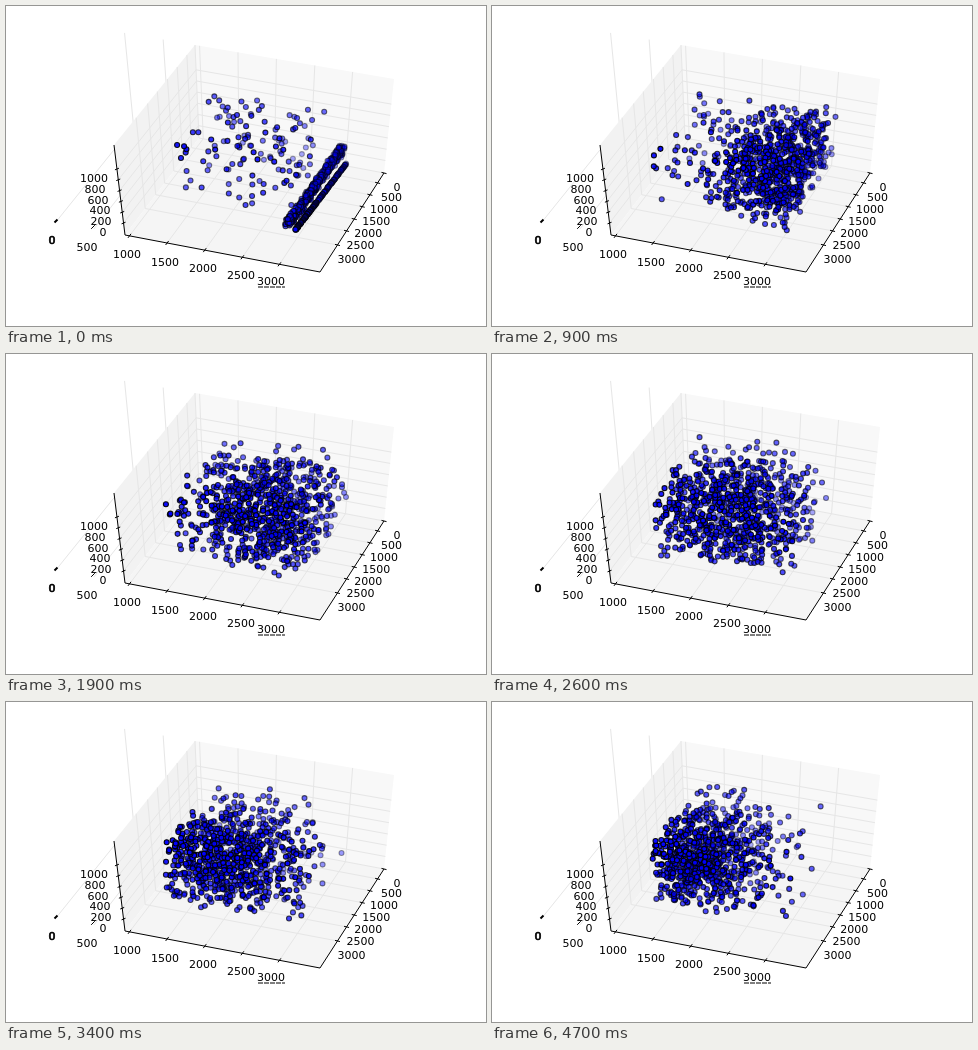
Animation of 480x320 px, one loop 4800 ms. Source, as an HTML page with a canvas:

```html
<!DOCTYPE html>
<html lang="en">
<head>
<meta charset="utf-8">
<title>3D scatter</title>
<style>
  html, body { margin: 0; width: 100%; height: 100%; overflow: hidden; background: #fff; }
  svg, canvas { position: absolute; left: 0; top: 0; width: 480px; height: 320px; }
  text { font: 11px "DejaVu Sans", Verdana, sans-serif; text-anchor: middle; fill: #000; }
  .grid { stroke: #e6e6e6; fill: none; }
  .axis { stroke: #000; fill: none; }
</style>
</head>
<body>
<svg id="plot" viewBox="0 0 480 320"></svg>
<canvas id="cloud" width="480" height="320"></canvas>
<script>
const LOOP = 4800, STEP = 100;
const svg = document.getElementById('plot');
const ctx = document.getElementById('cloud').getContext('2d');

// Corners of the box: [back left, back right, front left, front right]
const FLOOR = [[193, 132], [378, 167], [119, 229], [314, 266]];
const TOP = [[189, 39], [388, 73], [108, 139], [321, 178]];

const mix = (a, b, k) => [a[0] + (b[0] - a[0]) * k, a[1] + (b[1] - a[1]) * k];
const face = (q, u, v) => mix(mix(q[0], q[1], u), mix(q[2], q[3], u), v);
const project = (u, v, w) => mix(face(FLOOR, u, v), face(TOP, u, v), w);

function add(tag, attrs, text) {
  const el = document.createElementNS('http://www.w3.org/2000/svg', tag);
  for (const key in attrs) el.setAttribute(key, attrs[key]);
  if (text !== undefined) el.textContent = text;
  svg.append(el);
}
const pane = (fill, ...pts) => add('polygon', { points: pts.join(' '), fill });
const line = (cls, ...pts) => add('polyline', { points: pts.join(' '), class: cls });
const label = (x, y, text) => add('text', { x, y: y + 4 }, text);
const tick = (x, y, dx, dy) => line('axis', [x - dx, y - dy], [x + dx, y + dy]);

function drawBox() {
  const yLines = [-0.354, -0.16, 0.023, 0.216, 0.409, 0.602, 0.792];
  const wall = u => line('grid', project(u, 0, 1), project(u, 0, 0), project(u, 1, 0));
  yLines.slice(0, 2).forEach(wall);

  pane('#f2f2f2', TOP[0], TOP[2], FLOOR[2], FLOOR[0]);
  pane('#f8f8f8', TOP[0], TOP[1], FLOOR[1], FLOOR[0]);
  pane('#f5f5f5', FLOOR[0], FLOOR[1], FLOOR[3], FLOOR[2]);
  yLines.slice(2).forEach(wall);

  // depth axis on the right
  [0, 0.1, 0.22, 0.34, 0.465, 0.585, 0.727].forEach((v, i) => {
    line('grid', project(0, v, 1), project(0, v, 0), project(1, v, 0));
    const [x, y] = project(1, v, 0);
    tick(x, y, 2.5, 0.6);
    label(x + 14 - (i === 0 ? 1 : 0), y + 14, i * 500);
  });

  // height axis on the left
  for (let i = 0; i <= 5; i++) {
    const w = 0.133 + i * 0.12;
    line('grid', project(0, 1, w), project(0, 0, w), project(1, 0, w));
    const [x, y] = project(0, 1, w);
    tick(x, y, 2, -0.8);
    label([97, 95, 94, 92, 89, 88][i], y + 9, i * 200);
  }

  // width axis along the bottom
  for (let i = 2; i <= 6; i++) {
    const [x, y] = project(yLines[i], 1, 0);
    tick(x, y, 1.5, -2);
    label([121, 159, 197, 235, 265][i - 2], y + [18.5, 19, 18, 18, 17][i - 2], 500 + i * 250 + (i - 2) * 250);
  }
  add('line', { x1: 252, x2: 279, y1: 281, y2: 281, stroke: '#000', 'stroke-dasharray': '5 1' });

  line('axis', TOP[2], FLOOR[2], FLOOR[3], FLOOR[1]);

  // ticks and labels that fall outside the box
  tick(87, 221, 1.8, -1.8);
  label(81, 241, 500);
  add('line', { x1: 48.5, y1: 216.5, x2: 51.5, y2: 213.5, stroke: '#000', 'stroke-width': 2 });
  add('text', { x: 46, y: 238, stroke: '#000', 'stroke-width': 0.7 }, 0);
}

let seed = 20731;
function rand() {
  seed = (seed * 1664525 + 1013904223) % 4294967296;
  return seed / 4294967296;
}
const gauss = () => (rand() + rand() + rand() + rand() - 2) * 1.73;

// Bounce a value back and forth between two walls
function fold(x, lo, hi) {
  const span = hi - lo;
  const m = (((x - lo) % (2 * span)) + 2 * span) % (2 * span);
  return lo + (m < span ? m : 2 * span - m);
}

const U = [0.1, 0.8], V = [0, 0.69], W = [0.01, 0.65];

function makePoint(i) {
  const p = { du: -0.12 + gauss() * 0.04, dv: 0.045 + gauss() * 0.05, dw: gauss() * 0.3,
              su: gauss() * 0.15, sw: rand() * 0.55 };
  const k = rand();
  if (i < 130) {
    Object.assign(p, { u: 0.12 + rand() * 0.6, v: k * 0.62, w: 0.02 + rand() * 0.61, su: 0, sw: 0 });
    p.du *= 0.4;
    p.dw *= 0.5;
  } else if (i < 360) {
    Object.assign(p, { u: 0.765 + 0.03 * (1 - k), v: k * 0.69, w: 0.015 + rand() * 0.015 });
  } else {
    Object.assign(p, { u: 0.715 + 0.055 * (1 - k) + gauss() * 0.008, v: k * 0.66,
                       w: 0.04 + 0.14 * (1 - k) + gauss() * 0.025 });
  }
  return p;
}
const points = Array.from({ length: 850 }, (_, i) => makePoint(i));

function place(p, t) {
  const spread = 1 - Math.exp(-2.2 * t);
  const u = fold(p.u + p.du * t + p.su * spread, ...U);
  const v = fold(p.v + p.dv * t, ...V);
  const w = fold(p.w + p.dw * t + p.sw * spread, ...W);
  const [x, y] = project(u, v, w);
  return { x, y, near: 0.55 * v / V[1] + 0.45 * w / W[1] };
}

function drawCloud(t) {
  ctx.clearRect(0, 0, 480, 320);
  ctx.fillStyle = '#00f';
  ctx.strokeStyle = '#000';
  ctx.lineWidth = 1.1;
  const dots = points.map(p => place(p, t)).sort((a, b) => a.near - b.near);
  for (const { x, y, near } of dots) {
    ctx.globalAlpha = Math.min(1, 0.3 + 0.7 * near);
    ctx.beginPath();
    ctx.arc(x, y, 2.5, 0, 2 * Math.PI);
    ctx.fill();
    ctx.stroke();
  }
}

drawBox();
const start = performance.now();
let shown = -1;
function frame() {
  const step = Math.floor(((performance.now() - start) % LOOP) / STEP);
  if (step !== shown) {
    shown = step;
    drawCloud(step * STEP / 1000);
  }
  requestAnimationFrame(frame);
}
frame();
</script>
</body>
</html>
```
